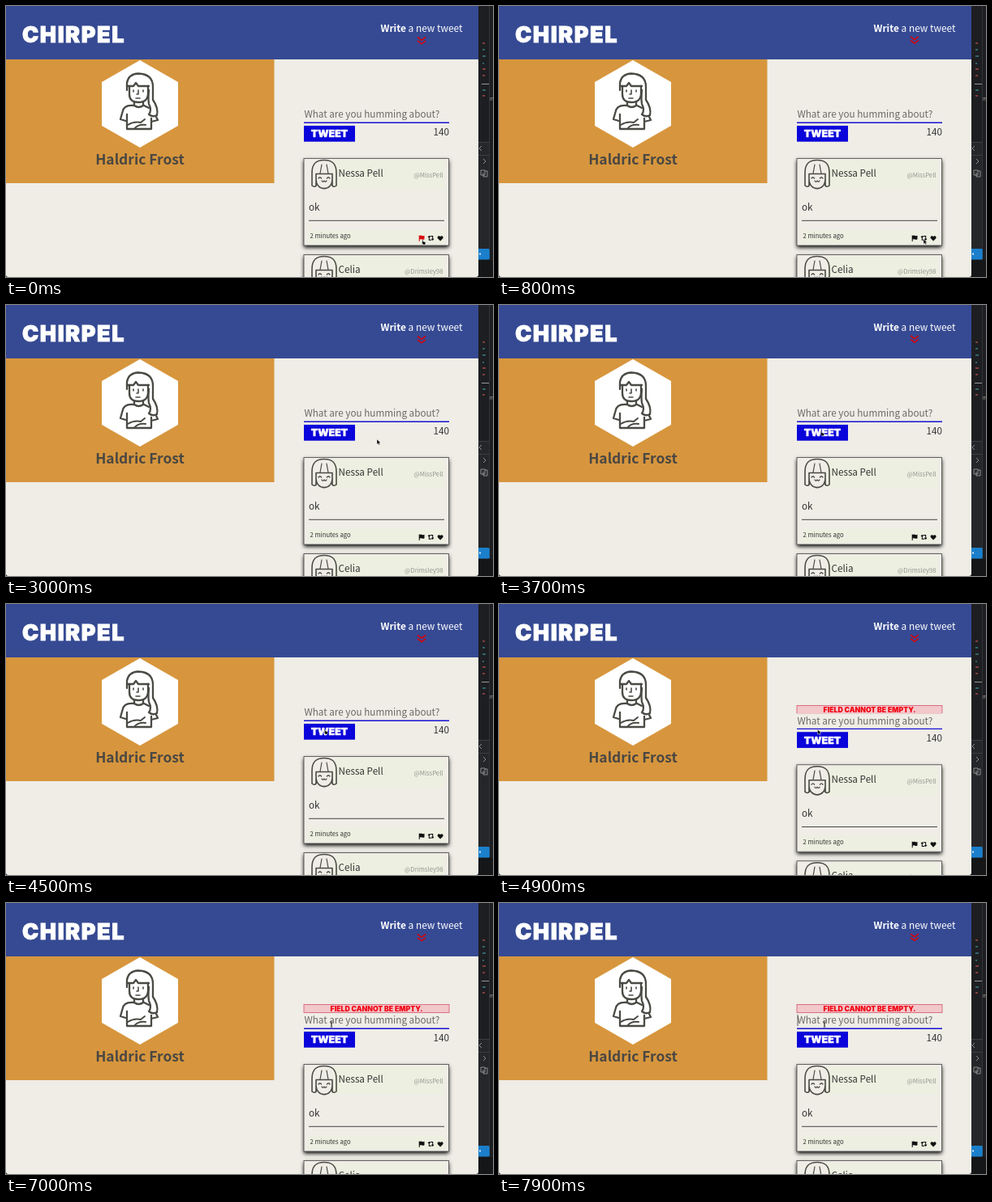
An HTML page for the animation above (8 s loop, 600 px wide and 335 px high).

```html
<!DOCTYPE html>
<html lang="en">
<head>
<meta charset="utf-8">
<title>Social feed demo</title>
<style>
  html, body { margin: 0; width: 100%; height: 100%; overflow: hidden; background: #1d1e21; }
  svg { display: block; width: 100%; height: 100%; }
  text { font-family: "Noto Sans CJK JP", "Noto Sans CJK SC", "Open Sans", sans-serif; font-size: 11.7px; fill: #333; }
  .block { font-family: Inter, Lato, sans-serif; font-weight: 900; fill: #fff; }
  .small { font-size: 7.7px; }
  .handle { fill: #969592; text-anchor: end; }
  .line { fill: none; stroke: #4a4a45; stroke-linecap: round; stroke-linejoin: round; }
</style>
</head>
<body>
<svg viewBox="0 0 600 335" preserveAspectRatio="none">
  <defs>
    <clipPath id="errorClip"><rect id="errorWindow" x="366" y="124" width="181" height="0"/></clipPath>
    <filter id="shadow" x="-10%" y="-10%" width="120%" height="125%">
      <feDropShadow dx="0" dy="2.5" stdDeviation="2.4" flood-color="#000"/>
    </filter>

    <g id="face" class="line" stroke-width="1.6">
      <path d="M382 222Q380 224.500 377 222V206C377 194 383 190.500 392 190.500S407 194 407 206V222Q404 224.500 402 222"/>
      <path d="M382 222V207.500H402V222M382 214C382 229.500 402 229.500 402 214"/>
      <path d="M387 207L389 196M397 207L395 196" stroke-width="1.2"/>
      <path d="M385 213q1.800-2.500 3.600 0M395.400 213q1.800-2.500 3.600 0M389 216q1.500 2.500 3 0 1.500 2.500 3 0" stroke-width="1.3"/>
    </g>

    <g id="card">
      <rect x="367" y="188.500" width="178.500" height="107.500" fill="#efede6" filter="url(#shadow)"/>
      <path d="M404 191h136v35H404z M373 277h167v17H373z" fill="#edefe0"/>
      <rect x="367" y="188.500" width="178.500" height="107.500" fill="none" stroke="#555" stroke-width=".9"/>
      <path d="M373 265.300H540" stroke="#444" stroke-width="1"/>
      <use href="#face"/>
    </g>
  </defs>

  <!-- editor window behind the page -->
  <rect width="600" height="335" fill="#1d1e21"/>
  <g>
    <path d="M582 168h14v132h-14z" fill="#25262a"/>
    <path d="M595.500 0V313" stroke="#303236"/>
    <path d="M582 168.500h14M582 184.500h14" stroke="#3c3e42"/>
    <path d="M587 46h3M587 78h4M587 86h3M587 111h3" stroke="#a34848" stroke-width="1.300"/>
    <path d="M587 54h3M587 62h4M587 71h2M587 104h4" stroke="#397d83" stroke-width="1.300"/>
    <path d="M586 96.500h9" stroke="#999"/>
    <path d="M586 173l-3 3 3 3M588 189l3 3-3 3M585 203h5v6h-5zM588 206v5h5v-7h-3" fill="none" stroke="#999" stroke-width=".9"/>
    <text x="596" y="117" style="font-size:6px;fill:#aaa">m</text>
    <rect x="580" y="300" width="15.800" height="13.500" rx="1.500" fill="#1b7fcb"/>
    <path d="M583 306.500h2" stroke="#d5e7f5" stroke-width="2"/>
    <rect x="582" y="314" width="18" height="21" fill="#151618"/>
  </g>

  <!-- page -->
  <path d="M0 0H582V332q0 3-3 3H3q-3 0-3-3z" fill="#efede6"/>
  <rect width="582" height="66" fill="#364a93"/>
  <text class="block" x="20" y="45" stroke="#fff" stroke-width=".9" style="font-size:27px;letter-spacing:1.6px">CHIRPEL</text>
  <text x="461.500" y="32" style="font-size:11.9px;fill:#fff"><tspan font-weight="700">Write</tspan> a new tweet</text>
  <path id="chevrons" d="M507 38.500l5 3.800 5-3.800M507 43l5 3.800 5-3.800" fill="none" stroke="#cf0612" stroke-width="1.700"/>

  <rect y="66" width="330.500" height="153" fill="#d7963d"/>
  <path d="M165 67l47 27v54l-47 27-47-27V94z" fill="#fff"/>
  <g class="line" stroke-width="2.300">
    <path d="M149 104V95Q151 84 163 83.500Q181 84 181 100V116"/>
    <path d="M152 99V109Q152 119 163 119Q175 119 175 108V99"/>
    <path d="M149 99H157L160 95L163 99H176"/>
    <path d="M176 104Q175 115 176 121Q180 129 176 134Q181 138 186 135Q188 126 181 116"/>
    <path d="M158 119v4q5.500 4 11 0v-4M157 123Q145 122 143.500 131L141 140L149 142.500M149 134V152H179V139M170 123L176 126M185 137l2 4-8 2"/>
    <path d="M150 147Q158 142 166 144L171 140M158 152q4-6 14-5" stroke-width="2"/>
    <path d="M157 104v2M169 104v2M163 104v5h-2M160 114h5" stroke-width="1.600"/>
  </g>
  <text x="165" y="196" text-anchor="middle" style="font-size:17.400px;font-weight:700;fill:#4a4743">Haldric Frost</text>

  <g clip-path="url(#errorClip)">
    <rect x="367" y="125.500" width="179" height="10" fill="#f2c8cb" stroke="#d9627a" stroke-width=".9"/>
    <text class="block" x="456.500" y="133.800" text-anchor="middle" style="font-size:8.7px;fill:#f20010">FIELD CANNOT BE EMPTY.</text>
  </g>

  <g id="feed">
    <text x="367.500" y="138.300" style="fill:#6b6863">What are you humming about?</text>
    <path id="caret" d="M368 127v14" stroke="#333" stroke-width=".8"/>
    <path d="M367 144.200H546" stroke="#1811d2" stroke-width="1.400"/>
    <rect x="367" y="148" width="63" height="19.700" fill="#0a04da"/>
    <text class="block" x="398.500" y="162.300" text-anchor="middle" stroke="#fff" stroke-width=".4" style="font-size:12.300px">TWEET</text>
    <text x="546" y="160" text-anchor="end">140</text>

    <use href="#card"/>
    <text x="409.500" y="210.500">Nessa Pell</text>
    <text class="small handle" x="538.500" y="211.500">@MissPell</text>
    <text x="373" y="253">ok</text>
    <text class="small" x="374.500" y="286.500">2 minutes ago</text>
    <path id="flag" d="M508.700 283.500v7.500h1v-2.500q1.600-.7 2.900 0t2.900-.2v-4.500q-1.400.7-2.800.1t-3 .1v-.5z"/>
    <path d="M519.500 286l1.800-2.300 1.800 2.300h-1.300v2.800h2.500v1h-3.500V286zM527.500 287.800l-1.800 2.300-1.800-2.300h1.300V285h-2.500v-1h3.500v3.800z"/>
    <path id="heart" d="M535.100 290.500l-3-3.100c-1.700-2 1.200-4.700 3-2.300 1.800-2.400 4.700.3 3 2.300z"/>

    <use href="#card" y="119"/>
    <text x="409.500" y="329.500">Celia</text>
    <text class="small handle" x="538.500" y="330.500">@Drimsley98</text>
  </g>

  <g id="pointer" stroke="#fff" stroke-width=".4" stroke-linejoin="round">
    <path id="arrow" d="M0 0v6.200l1.500-1.300 1 2.200 1.100-.5-1-2.100h2z"/>
    <path id="hand" d="M-.4 0q.7-.7 1.100.4l.3 1.700 2.300.7q.8.300.5 1.400l-.4 1.800H1.200L-1 3.700q-.2-.9 1-.1z"/>
    <path id="beam" d="M-1.300-3.500q1.300 0 1.300 1v5q0 1-1.300 1M1.300-3.500q-1.300 0-1.300 1v5q0 1 1.300 1" fill="none" stroke="#333" stroke-width=".8"/>
  </g>
</svg>

<script>
  const LOOP = 8000;
  const SLIDE = { start: 4570, length: 400, distance: 11 };
  const $ = id => document.getElementById(id);
  const clamp = v => Math.max(0, Math.min(1, v));
  const swing = v => 0.5 - Math.cos(Math.PI * clamp(v)) / 2;
  const show = (id, on) => $(id).setAttribute('visibility', on ? 'visible' : 'hidden');

  // time, x, y
  const route = [
    [0, 513, 289], [500, 513, 289], [800, 523, 288], [1100, 523, 288],
    [1400, 533.5, 287], [2100, 533.5, 287], [2850, 457, 166], [3200, 457, 166],
    [3800, 392.5, 155], [5000, 392.5, 155], [5500, 391.5, 166],
    [6500, 391.5, 166], [7000, 401, 150], [8000, 401, 150]
  ];

  function pointerAt(t) {
    const i = Math.max(1, route.findIndex(p => p[0] > t));
    const [a, b] = [route[i - 1], route[i]];
    const k = swing((t - a[0]) / (b[0] - a[0]));
    return [a[1] + (b[1] - a[1]) * k, a[2] + (b[2] - a[2]) * k];
  }

  function draw(t) {
    const shift = SLIDE.distance * swing((t - SLIDE.start) / SLIDE.length);
    $('feed').setAttribute('transform', `translate(0 ${shift})`);
    $('errorWindow').setAttribute('height', shift && shift + 1);

    const bob = 0.6 * Math.sin(t / 1000 * 2 * Math.PI);
    $('chevrons').setAttribute('transform', `translate(0 ${bob})`);

    const [x, y] = pointerAt(t);
    const inside = (left, right, top, bottom) =>
      x >= left && x <= right && y >= top + shift && y <= bottom + shift;
    const onFlag = inside(507, 517, 282, 292);
    const onHeart = inside(530, 540, 282, 292);
    const onButton = inside(367, 430, 148, 168);
    const onInput = inside(367, 546, 126, 144);
    const hand = onFlag || onHeart || onButton;

    $('pointer').setAttribute('transform', `translate(${x} ${y})`);
    show('hand', hand);
    show('beam', onInput);
    show('arrow', !hand && !onInput);
    $('flag').setAttribute('fill', onFlag ? '#d90b0b' : '#111');
    $('heart').setAttribute('fill', onHeart ? '#d90b0b' : '#111');
    show('caret', t > 7300 && (t - 7300) % 1000 < 700);
  }

  const begin = performance.now();
  function tick() {
    draw((performance.now() - begin) % LOOP);
    requestAnimationFrame(tick);
  }
  tick();
</script>
</body>
</html>
```
